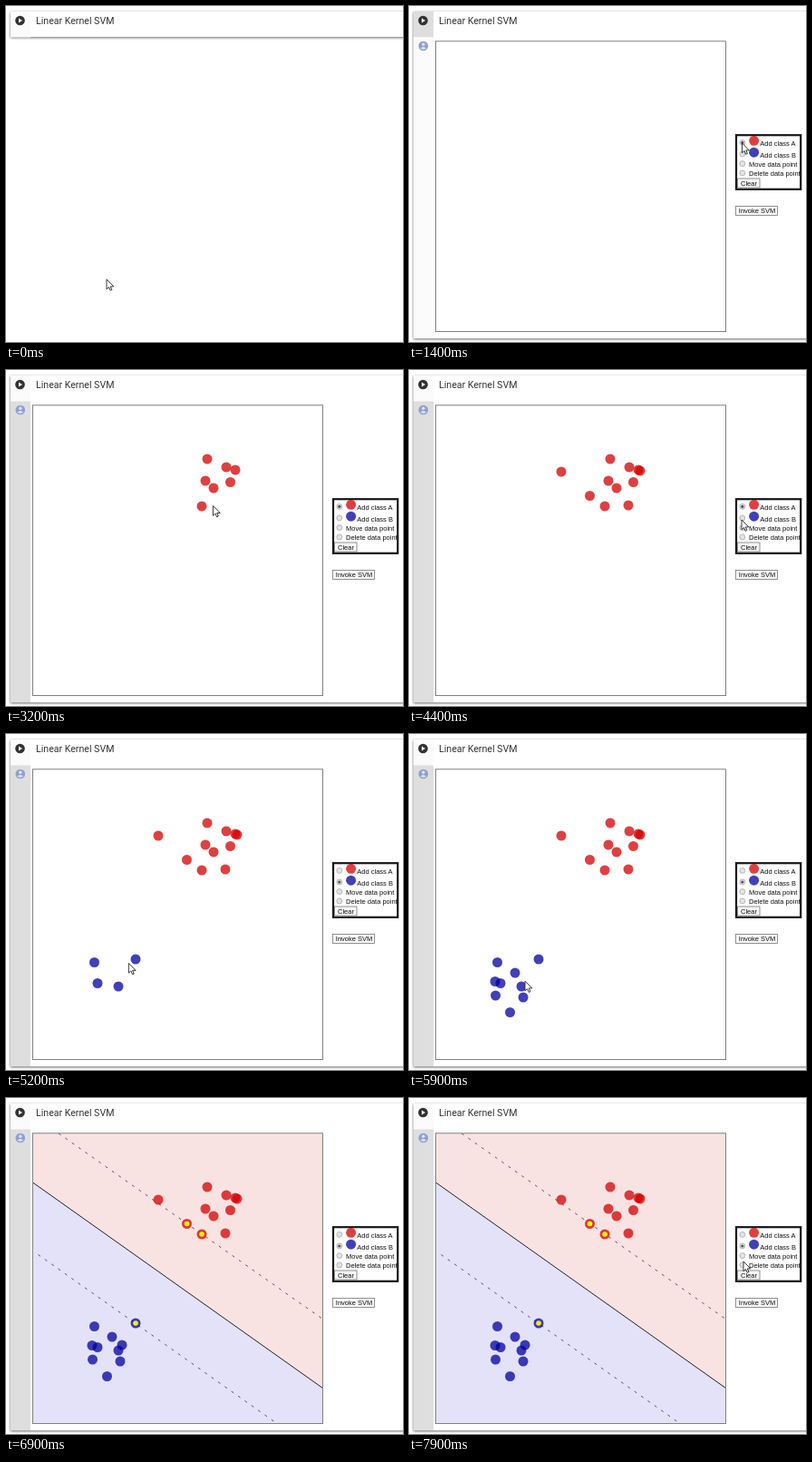
These frames come from a looping animation (438 px wide and 370 px high, 8 s). An HTML page:

```html
<!DOCTYPE html>
<html lang="en">
<head>
<meta charset="utf-8">
<title>Linear Kernel SVM</title>
<style>
  html, body { margin: 0; width: 100%; height: 100%; overflow: hidden; background: #fff; }
  svg { display: block; width: 438px; height: 370px; }
  text { font: 7.5px "Liberation Sans", Arial, sans-serif; fill: #111; }
  .title { font: 10.6px Roboto, sans-serif; fill: #333; }
  #cell { fill: #fff; filter: drop-shadow(0 1px 1.5px rgba(0, 0, 0, .6)); }
  .button { fill: #f7f7f7; stroke: #777; stroke-width: .8; }
  .A { fill: #d30000; fill-opacity: .75; }
  .B { fill: #0000a0; fill-opacity: .75; }
  .margin { stroke: #333; stroke-width: .8; stroke-dasharray: 3 6; }
  .radio { fill: #e2e2e2; stroke: #aaa; stroke-width: .8; }
</style>
</head>
<body>
<svg viewBox="0 0 438 370">
  <rect id="cell" x="5" y="6" width="450" height="28"/>
  <rect id="headGutter" x="5" y="6" width="22" height="28.5"/>
  <g id="play">
    <circle cx="15.5" cy="16" r="5.3" fill="#333"/>
    <path d="M14 13.4V18.6L18 16Z" fill="#fff"/>
  </g>
  <g id="stop">
    <circle cx="16" cy="16" r="4.3" fill="#333"/>
    <rect x="14.4" y="14.4" width="3.2" height="3.2" fill="#fff"/>
    <path id="spinner" d="M16 9.3A6.7 6.7 0 1 1 9.3 16" fill="none" stroke="#444" stroke-width="1.4"/>
  </g>
  <text class="title" x="33" y="20">Linear Kernel SVM</text>

  <g id="output">
    <rect id="bodyGutter" x="5" y="34.5" width="22" height="331.5"/>
    <circle cx="15.8" cy="44" r="5.3" fill="#8f9fd2"/>
    <circle cx="15.8" cy="42.3" r="1.7" fill="#dfe4f5"/>
    <path d="M12.6 46.7Q15.8 43.4 19 46.7Q15.8 49 12.6 46.7Z" fill="#dfe4f5"/>
    <g id="result">
      <path d="M29.5 39H349.5V319.5L29.5 93Z" fill="#f9e3e2"/>
      <path d="M29.5 93L349.5 319.5V358.5H29.5Z" fill="#e3e2f9"/>
      <path d="M29.5 93L349.5 319.5" stroke="#222"/>
      <path class="margin" d="M58 39L349.5 243.5M35.5 172.5L299 358.5" fill="none"/>
    </g>
    <rect x="29.5" y="38.8" width="320" height="319.7" fill="none" stroke="#808080"/>
    <g id="dots"></g>
    <g id="support" fill="#fff200"></g>
    <rect x="361" y="142.2" width="71.2" height="59.6" fill="#fff" stroke="#161616" stroke-width="2.2"/>
    <circle class="A" cx="380.6" cy="148.3" r="5.5"/>
    <circle class="B" cx="380.6" cy="161.2" r="5.5"/>
    <g id="radios"></g>
    <rect class="button" x="362.5" y="190" width="24.5" height="10"/>
    <text x="366" y="197.5">Clear</text>
    <rect class="button" x="360.5" y="220.5" width="46" height="10"/>
    <text x="363.8" y="228.2">Invoke SVM</text>
  </g>
  <path id="cursor" d="M0 0V10.8L2.5 8.5L4.2 12.3L5.9 11.5L4.3 7.9H7.8Z" fill="#fff" stroke="#222" stroke-width=".9"/>
</svg>
<script>
const LOOP = 8000, STEP = 100;
const $ = id => document.getElementById(id);

function add(parent, tag, attrs, text = "") {
  const el = document.createElementNS("http://www.w3.org/2000/svg", tag);
  for (const key in attrs) el.setAttribute(key, attrs[key]);
  el.textContent = text;
  return parent.appendChild(el);
}

// Clicks of one class follow each other at an even pace
function plot(cls, start, pace, places) {
  return places.split(" ").map((place, i) => {
    const [x, y] = place.split(",").map(Number);
    const el = add($("dots"), "circle", { class: cls, cx: x, cy: y, r: 5.5 });
    return { time: start + i * pace, x, y, el };
  });
}
const red = plot("A", 2130, 165,
  "247.5,123.5 229,130 220,122 222,98 243,107 253,110 216,150 242,149 199.5,138.5 168,112 255,111");
const blue = plot("B", 4780, 125,
  "97.5,251.5 101,274.5 124,278 143,248 117,263 95,272.5 95.5,288 111.5,306.5 126,290 128,272");
const dots = [...red, ...blue];

for (const { x, y } of [red[6], red[8], blue[3]])
  add($("support"), "circle", { cx: x, cy: y, r: 2.8 });

// Stops of the pointer apart from the plotted dots
const stops = [
  [0, 111, 301], [300, 150, 205], [700, 13, 17], [1000, 13, 17],
  [1400, 367.5, 151], [1600, 367.5, 151], [4300, 367, 165], [4500, 367, 165],
  [6100, 373, 224], [7600, 424, 286], [7900, 369, 180]
].map(([time, x, y]) => ({ time, x, y }));
const track = [...stops, ...dots].sort((a, b) => a.time - b.time);

const labels = ["Add class A", "Add class B", "Move data point", "Delete data point"];
const marks = labels.map((label, i) => {
  const adds = i < 2;
  const cy = adds ? 150.4 + 12.6 * i : 153 + 10.3 * i;
  add($("radios"), "circle", { class: "radio", cx: 367.8, cy, r: 3 });
  add($("radios"), "text", { x: adds ? 387.3 : 375, y: cy + (adds ? 3.6 : 3) }, label);
  return add($("radios"), "circle", { cx: 367.8, cy, r: 1.6, fill: "#555" });
});

const show = (el, on) => el.setAttribute("visibility", on ? "inherit" : "hidden");
const within = (t, from, to) => t >= from && t < to;

function position(t) {
  const i = track.findIndex(stop => stop.time > t);
  const b = track.at(i), a = i < 0 ? b : track[i - 1];
  const k = a === b ? 1 : (t - a.time) / (b.time - a.time);
  const e = k * k * (3 - 2 * k);
  return [a.x + (b.x - a.x) * e, a.y + (b.y - a.y) * e];
}

function draw(t) {
  const open = t >= 1100, solved = t >= 6900;
  const running = within(t, 900, 1200) || within(t, 6200, 6900);
  const gutter = hovered => hovered ? "#dedede" : "#fbfbfb";

  $("cell").setAttribute("height", open ? 360 : 28);
  $("headGutter").setAttribute("fill", gutter(within(t, 900, 1700)));
  $("bodyGutter").setAttribute("fill", gutter(t >= 1700));
  show($("output"), open);
  show($("play"), !running);
  show($("stop"), running);
  $("spinner").setAttribute("transform", `rotate(${(t - 6800) * .6} 16 16)`);
  show($("result"), solved);
  show($("support"), solved);

  for (const dot of dots) show(dot.el, t >= dot.time);
  marks.forEach((mark, i) => show(mark, i === (t < 4500 ? 0 : 1)));

  show($("cursor"), !within(t, 6700, 7700));
  $("cursor").setAttribute("transform", `translate(${position(t)})`);
}

const start = performance.now();
function tick() {
  const t = (performance.now() - start) % LOOP;
  draw(Math.floor(t / STEP) * STEP);
  requestAnimationFrame(tick);
}
tick();
</script>
</body>
</html>
```
